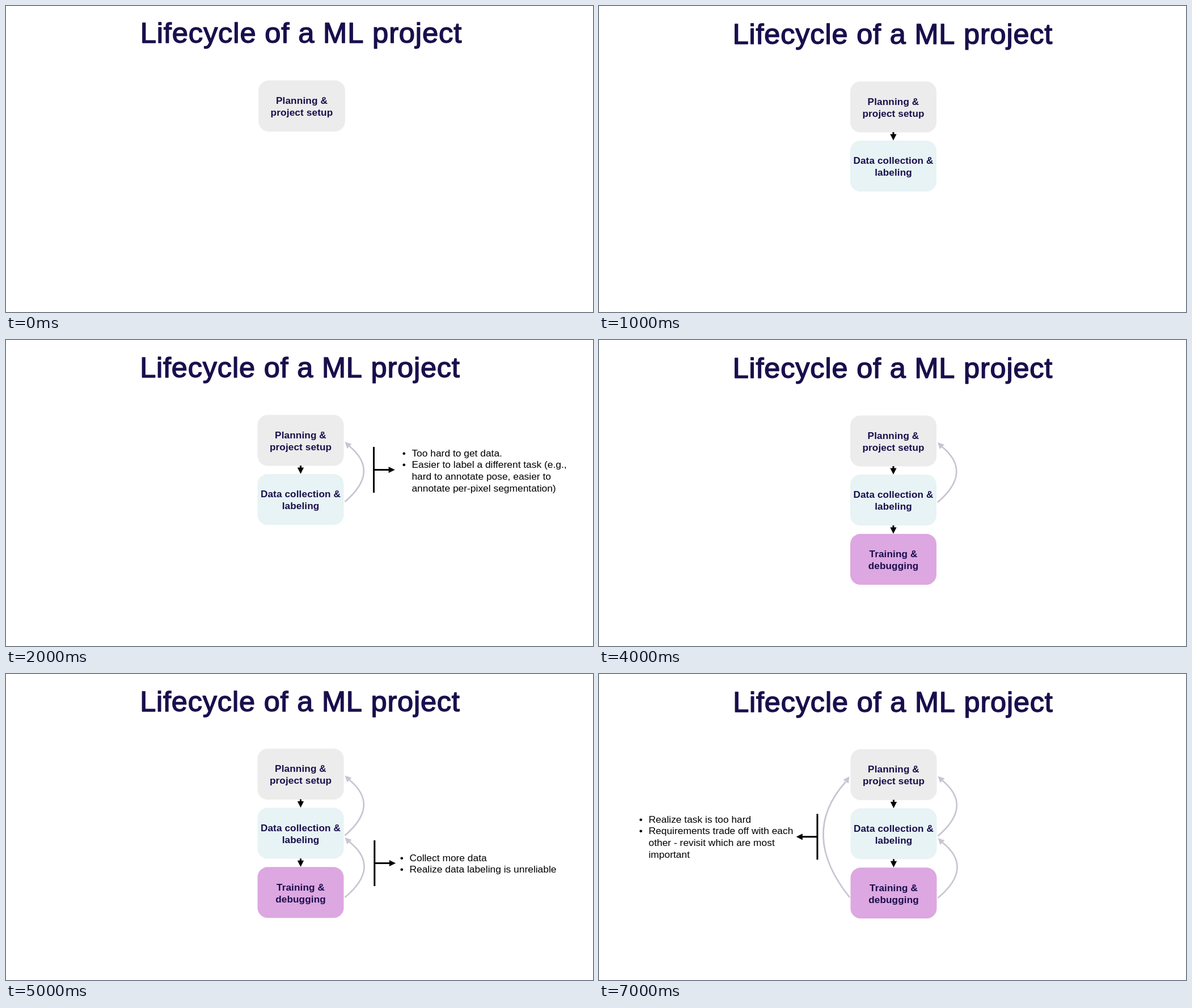
An HTML page with a canvas for the animation above (8000 ms loop, 1035 px wide and 541 px high).

```html
<!DOCTYPE html>
<html lang="en">
<head>
<meta charset="utf-8">
<title>Lifecycle of a ML project</title>
<style>
  html, body { margin: 0; width: 100%; height: 100%; overflow: hidden; background: #fff; }
  canvas { display: block; width: 1035px; height: 541px; }
</style>
</head>
<body>
<canvas id="stage"></canvas>
<script>
const W = 1035, H = 541, LOOP = 8000;
const FONT = '"Liberation Sans", Arial, Helvetica, sans-serif';
const INK = '#1a0f4c', LINK = '#c9c4d2';

const canvas = document.getElementById('stage');
const ctx = canvas.getContext('2d');
const dpr = window.devicePixelRatio || 1;
canvas.width = W * dpr;
canvas.height = H * dpr;

// Coordinates are relative to the top centre of the first box.
const boxes = [
  { y: 0, fill: '#ececec', lines: ['Planning &', 'project setup'] },
  { y: 104.5, fill: '#e7f3f4', lines: ['Data collection &', 'labeling'] },
  { y: 209.3, fill: '#dda7e1', lines: ['Training &', 'debugging'] }
];

// Each link is a quadratic curve: start, control, end, then the arrow tip.
const links = {
  dataToPlan: [78, 153.5, 141, 99.8, 85, 54.5, 78, 47.5],
  trainToData: [78, 263, 142.5, 209, 85, 164, 78, 157],
  trainToPlan: [-77.5, 262, -167, 150, -84.5, 57.5, -78, 48]
};

const notes = {
  data: {
    bar: [129, 97, 1], text: [195.9, 73.2],
    lines: ['*Too hard to get data.', '*Easier to label a different task (e.g.,',
      'hard to annotate pose, easier to', 'annotate per-pixel segmentation)']
  },
  train: {
    bar: [130.3, 202.5, 1], text: [191.9, 198.6],
    lines: ['*Collect more data', '*Realize data labeling is unreliable']
  },
  plan: {
    bar: [-134.5, 154.8, -1], text: [-432, 129.7],
    lines: ['*Realize task is too hard', '*Requirements trade off with each',
      'other - revisit which are most', 'important']
  }
};

const scenes = [
  { at: 0, pos: [521.5, 131.5], scale: 1.005, boxes: 1, links: [] },
  { at: 1000, pos: [519, 133.5], boxes: 2, links: [] },
  { at: 2000, pos: [519.5, 132.5], boxes: 2, links: ['dataToPlan'], note: 'data' },
  { at: 4000, pos: [519, 133.5], boxes: 3, links: ['dataToPlan'] },
  { at: 5000, pos: [519.5, 132], boxes: 3, links: ['dataToPlan', 'trainToData'], note: 'train' },
  { at: 7000, pos: [519.5, 133], boxes: 3, links: ['dataToPlan', 'trainToData', 'trainToPlan'], note: 'plan' }
];

function write(text, x, y, size, { weight = 400, align = 'left', color = '#000', spacing = 0 } = {}) {
  ctx.font = `${weight} ${size}px ${FONT}`;
  ctx.letterSpacing = `${spacing}px`;
  ctx.textAlign = align;
  ctx.fillStyle = color;
  ctx.fillText(text, x, y);
}

function line(x1, y1, x2, y2) {
  ctx.beginPath();
  ctx.moveTo(x1, y1);
  ctx.lineTo(x2, y2);
  ctx.stroke();
}

function arrowHead(x, y, angle, color) {
  ctx.save();
  ctx.translate(x, y);
  ctx.rotate(angle);
  ctx.fillStyle = color;
  ctx.beginPath();
  ctx.moveTo(0, 0);
  ctx.lineTo(-11.2, -5.6);
  ctx.lineTo(-11.2, 5.6);
  ctx.fill();
  ctx.restore();
}

function drawTitle() {
  const title = 'Lifecycle of a ML project', x = -1.1, y = -66.5;
  write(title, x, y, 50.5, { align: 'center', color: INK, spacing: 0.8 });
  // An outline gives a medium weight.
  ctx.strokeStyle = INK;
  ctx.lineWidth = 1.5;
  ctx.strokeText(title, x, y);
}

function drawBox({ y, fill, lines }, i) {
  ctx.fillStyle = fill;
  ctx.beginPath();
  ctx.roundRect(-76, y, 152, 90, 18);
  ctx.fill();
  lines.forEach((text, n) => write(text, 0, y + 41.3 + n * 21, 17.2,
    { weight: 700, align: 'center', color: INK, spacing: 0.1 }));
  if (i > 0) {
    ctx.strokeStyle = '#000';
    ctx.lineWidth = 3;
    line(0, y - 15, 0, y - 8);
    arrowHead(0, y - 0.3, Math.PI / 2, '#000');
  }
}

function drawLink([x1, y1, cx, cy, x2, y2, tx, ty]) {
  ctx.strokeStyle = LINK;
  ctx.lineWidth = 2.7;
  ctx.beginPath();
  ctx.moveTo(x1, y1);
  ctx.quadraticCurveTo(cx, cy, x2, y2);
  ctx.stroke();
  arrowHead(tx, ty, Math.atan2(ty - y2, tx - x2), LINK);
}

function drawNote({ bar: [x, y, dir], text: [tx, ty], lines }) {
  ctx.strokeStyle = '#000';
  ctx.lineWidth = 3;
  line(x, y - 40.5, x, y + 40.5);
  line(x, y, x + dir * 28, y);
  arrowHead(x + dir * 37.3, y, dir > 0 ? 0 : Math.PI, '#000');
  lines.forEach((text, n) => {
    const base = ty + n * 20.6;
    if (text[0] === '*') write('•', tx - 13.6, base, 17.4, { align: 'center' });
    write(text.replace('*', ''), tx, base, 17.4);
  });
}

function draw(now) {
  const t = now % LOOP;
  const scene = scenes.filter(s => s.at <= t).pop();
  ctx.setTransform(dpr, 0, 0, dpr, 0, 0);
  ctx.fillStyle = '#fff';
  ctx.fillRect(0, 0, W, H);
  ctx.translate(...scene.pos);
  ctx.scale(scene.scale || 1, scene.scale || 1);
  ctx.lineJoin = 'round';
  drawTitle();
  boxes.slice(0, scene.boxes).forEach(drawBox);
  scene.links.forEach(name => drawLink(links[name]));
  if (scene.note) drawNote(notes[scene.note]);
}

const start = performance.now();
function tick() {
  draw(performance.now() - start);
  requestAnimationFrame(tick);
}
tick();
</script>
</body>
</html>
```
